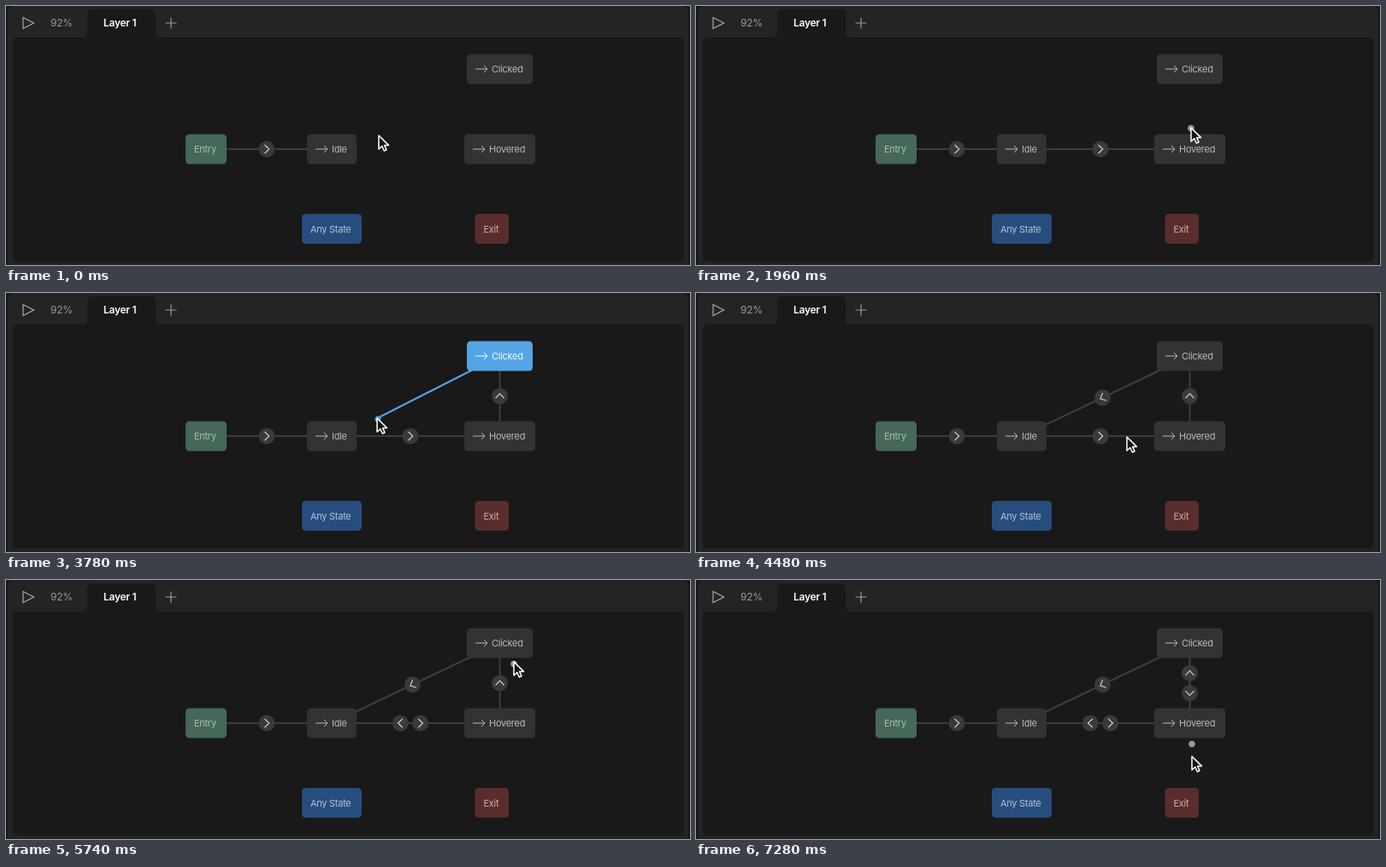
Recreate the animation shown at these times as an HTML page with a canvas. Size 800 px wide and 304 px high, loop 7910 ms.

```html
<!DOCTYPE html>
<html lang="en">
<head>
<meta charset="utf-8">
<title>State machine</title>
<style>
  html, body { margin: 0; width: 100%; height: 100%; overflow: hidden; background: #171717; }
  canvas { display: block; width: 800px; height: 304px; }
</style>
</head>
<body>
<canvas id="stage"></canvas>
<script>
const LOOP = 7910, STEP = 70;
const canvas = document.getElementById('stage');
const ratio = window.devicePixelRatio || 1;
canvas.width = 800 * ratio;
canvas.height = 304 * ratio;
const ctx = canvas.getContext('2d');
ctx.scale(ratio, ratio);

const node = (label, x, y, w, fill, ink) =>
  ({ label, x, y, w, h: 35, fill, ink, cx: x + w / 2, cy: y + 17.5 });
const state = (label, x, y, w) => node(label, x, y, w, '#333333', '#bababa');

const entry = node('Entry', 210, 150.5, 48, '#456858', '#aabfb4');
const anyState = node('Any State', 346, 244, 70, '#274d7f', '#b3c2d6');
const exit = node('Exit', 548.5, 244, 39.5, '#5a2d2d', '#c8afaf');
const idle = state('Idle', 352, 150.5, 58);
const hovered = state('Hovered', 536, 150.5, 83);
const clicked = state('Clicked', 539, 56.5, 77);
const states = [idle, hovered, clicked];
const nodes = [entry, anyState, exit, ...states];

// Each drag leaves a transition behind when it ends.
const drags = [
  { from: entry, to: idle, start: -1, end: -1 },
  { from: idle, to: hovered, start: 1120, end: 1680 },
  { from: hovered, to: clicked, start: 2240, end: 2660 },
  { from: clicked, to: idle, start: 3360, end: 3990 },
  { from: hovered, to: idle, start: 4970, end: 5390 },
  { from: clicked, to: hovered, start: 5810, end: 6300 }
];

// Pointer stops: time, x, y
const stops = [
  [0, 436, 152], [980, 423, 166], [1120, 418, 168], [1680, 552, 166],
  [1960, 579, 143], [2240, 578, 143], [2660, 577, 82], [3080, 530, 90],
  [3360, 530, 90], [3780, 434, 147], [3990, 394, 164], [4130, 398, 168],
  [4480, 504, 169], [4760, 529, 168], [4970, 529, 168], [5390, 396, 167],
  [5740, 594, 96], [5810, 592, 98], [6300, 584, 161], [6580, 582, 176],
  [7280, 580, 207], [LOOP, 580, 207]
];

function pointerAt(time) {
  const i = stops.findIndex(stop => stop[0] > time);
  const [t0, x0, y0] = stops[i - 1], [t1, x1, y1] = stops[i];
  const p = (time - t0) / (t1 - t0), eased = p * p * (3 - 2 * p);
  return { x: x0 + (x1 - x0) * eased, y: y0 + (y1 - y0) * eased };
}

function box(x, y, w, h, r, fill) {
  ctx.beginPath();
  ctx.roundRect(x, y, w, h, r);
  ctx.fillStyle = fill;
  ctx.fill();
}

function disc(x, y, r, fill) {
  ctx.beginPath();
  ctx.arc(x, y, r, 0, Math.PI * 2);
  ctx.fillStyle = fill;
  ctx.fill();
}

function stroke(path, color, width) {
  ctx.strokeStyle = color;
  ctx.lineWidth = width;
  ctx.stroke(new Path2D(path));
}

function text(label, x, y, color, size, weight = 400) {
  ctx.font = `${weight} ${size}px Inter, sans-serif`;
  ctx.letterSpacing = '-0.28px';
  ctx.textBaseline = 'alphabetic';
  ctx.fillStyle = color;
  ctx.fillText(label, x, y);
}

function drawPanel() {
  ctx.fillStyle = '#171717';
  ctx.fillRect(0, 0, 800, 304);
  box(2, 0, 796, 310, 7, '#242424');
  box(8, 37, 785, 263, 5, '#191919');
  ctx.fillStyle = '#191919';
  ctx.fill(new Path2D('M89 37Q95 37 95 31V10Q95 4 101 4H169Q175 4 175 10V31Q175 37 181 37Z'));
  stroke('M20 13.5L32.5 20L20 26.5Z', '#aaaaaa', 1.2);
  stroke('M186.5 20H199.5M193 13.5V26.5', '#999999', 1.2);
  text('92%', 52, 24.3, '#999999', 12);
  text('Layer 1', 114, 24.3, '#ffffff', 12, 600);
}

function drawNode(n, active) {
  const ink = active ? '#f2f8fd' : n.ink;
  box(n.x, n.y, n.w, n.h, 4.5, active ? '#55a4e3' : n.fill);
  const hasIcon = states.includes(n);
  if (hasIcon) {
    ctx.save();
    ctx.translate(n.x + 10, n.cy);
    stroke('M0 0H14M10 -4L14 0L10 4', ink, 1);
    ctx.restore();
  }
  text(n.label, n.x + (hasIcon ? 29 : 10), n.cy + 4, ink, 11);
}

// Fraction of the centre-to-centre line covered by a node.
function covered(n, dx, dy) {
  return Math.min(n.w / 2 / Math.abs(dx || 1e-6), n.h / 2 / Math.abs(dy || 1e-6));
}

function drawTransitions(made) {
  for (const { from, to } of made)
    stroke(`M${from.cx} ${from.cy}L${to.cx} ${to.cy}`, '#3d3d3d', 2);
  for (const { from, to } of made) {
    const dx = to.cx - from.cx, dy = to.cy - from.cy;
    const mid = (1 + covered(from, dx, dy) - covered(to, dx, dy)) / 2;
    const paired = made.some(d => d.from === to && d.to === from);
    ctx.save();
    ctx.translate(from.cx + dx * mid, from.cy + dy * mid);
    ctx.rotate(Math.atan2(dy, dx));
    ctx.translate(paired ? 11.7 : 0, 0);
    disc(0, 0, 9.5, '#3a3a3a');
    stroke('M-2.5 -5L2.8 0L-2.5 5', '#cccccc', 1.2);
    ctx.restore();
  }
}

// A handle follows the pointer just outside the nearest state.
function drawHandle(p) {
  const clamp = (v, low, high) => Math.max(low, Math.min(high, v));
  for (const n of states) {
    const x = clamp(p.x, n.x, n.x + n.w), y = clamp(p.y, n.y, n.y + n.h);
    const distance = Math.hypot(p.x - x, p.y - y);
    if (distance > 0 && distance < 24)
      disc(x + (p.x - x) / distance * 7, y + (p.y - y) / distance * 7, 3.7, '#9b9b9b');
  }
}

function drawPointer(p) {
  ctx.save();
  ctx.translate(p.x, p.y);
  const arrow = 'M0 0V16L3.8 12.5L6.3 18L9 16.8L6.6 11.4H11.5Z';
  ctx.lineJoin = 'round';
  ctx.fillStyle = '#161616';
  ctx.fill(new Path2D(arrow));
  stroke(arrow, '#ffffff', 1.5);
  ctx.restore();
}

function draw(time) {
  const pointer = pointerAt(time);
  const drag = drags.find(d => time >= d.start && time < d.end);
  drawPanel();
  drawTransitions(drags.filter(d => time >= d.end));
  if (drag) stroke(`M${drag.from.cx} ${drag.from.cy}L${pointer.x} ${pointer.y}`, '#55a4e3', 2);
  for (const n of nodes) drawNode(n, drag && n === drag.from);
  if (drag) disc(pointer.x + 1, pointer.y + 1, 3.5, '#55a4e3');
  else drawHandle(pointer);
  drawPointer(pointer);
}

const begin = performance.now();
function frame() {
  const time = (performance.now() - begin) % LOOP;
  draw(Math.floor(time / STEP) * STEP);
  requestAnimationFrame(frame);
}
frame();
</script>
</body>
</html>
```
